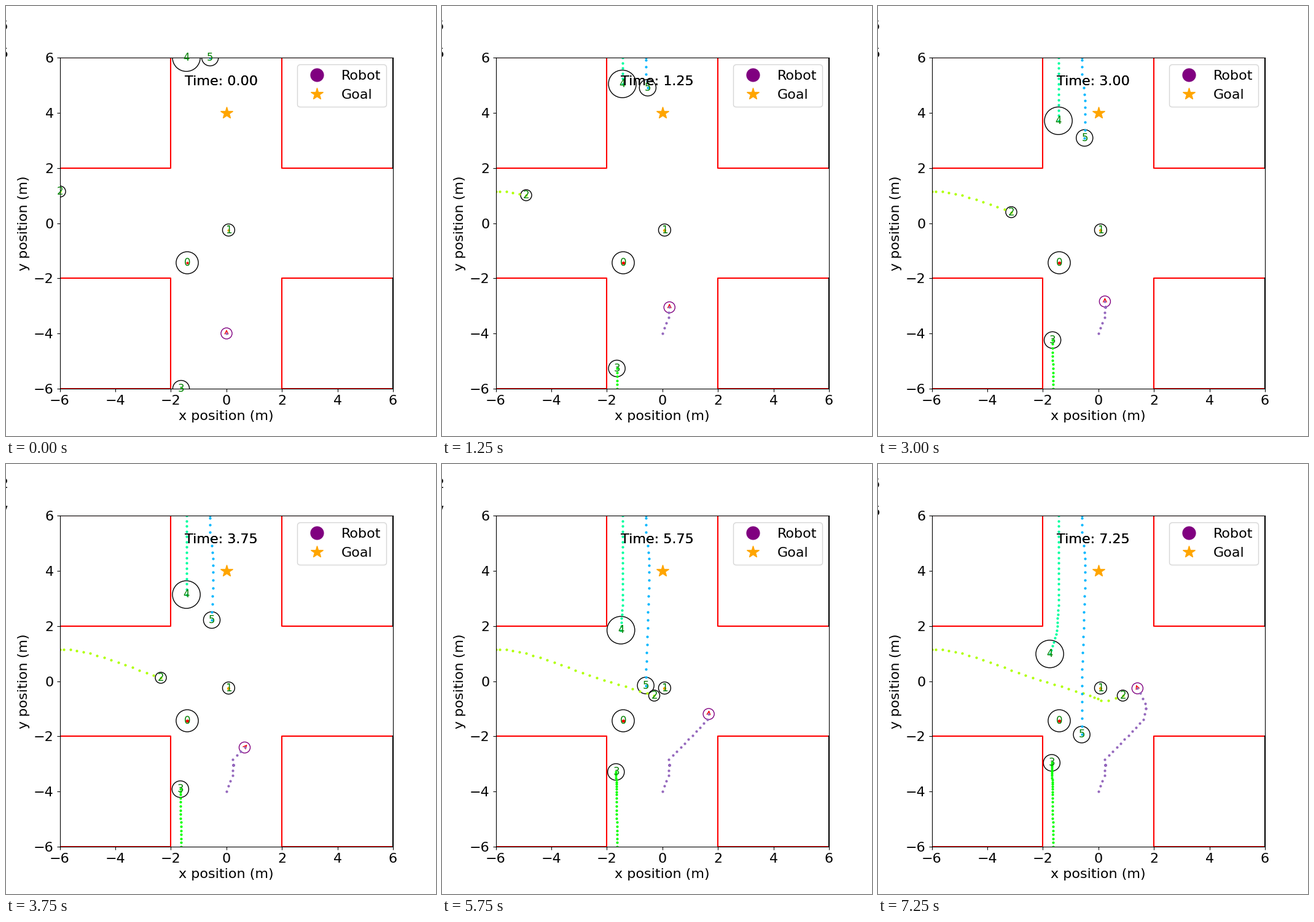
A matplotlib script for the animation above (7.5 s loop, 700 by 700 pixels).

```python
import numpy as np
import matplotlib
import matplotlib.pyplot as plt
from matplotlib.animation import FuncAnimation
from matplotlib.lines import Line2D
from matplotlib.patches import ArrowStyle, Circle, FancyArrowPatch

FRAMES = 30
STEP = 0.25  # seconds per frame
SIZE = 16
t = np.arange(FRAMES)


def keyed(*keys):
    """Piecewise linear motion through (step, value) pairs."""
    return np.interp(t, *zip(*keys))


# Each mover: radius, x and y over time in stage pixels
HUMANS = [
    (0.40, 295, 418),
    (0.22, 362.4, 364.7),
    (0.20,
     keyed((0, 88), (1, 94), (5, 137), (12, 217), (23, 345.5), (25, 358.5),
           (26, 363), (29, 398.5)),
     keyed((0, 302), (2, 302), (5, 308), (8, 319), (15, 348), (23, 377),
           (26, 385), (27, 385), (29, 377))),
    (0.30,
     285 - 0.076 * t,
     623 - np.minimum(6.6 * t, 180 * (1 - np.exp(-0.049 * t)))),
    (0.50,
     293.6 - 0.4 * np.clip(t - 17, 0, 6) - 2 * np.clip(t - 23.2, 0, None),
     84 + 8.57 * np.minimum(t, 18) + 6.45 * np.clip(t - 18, 0, None)),
    (0.30,
     keyed((3, 332.2), (7, 337.5), (9, 337.5), (15, 335), (23, 331.6)),
     keyed((0, 84), (1, 88), (5, 133), (9, 175.5), (15, 254), (29, 440.5))),
]
ROBOT = (0.20,
         keyed((0, 359), (3, 368.5), (5, 370.3), (12, 369.4), (15, 388.5),
               (19, 414), (22, 432), (24, 436.3), (26, 435), (29, 422.4)),
         keyed((0, 533), (5, 490.5), (11, 490), (12, 481), (15, 461.5),
               (22, 416), (24, 398), (25, 398), (29, 365.2)))
HEADING = np.radians(keyed((12, 90), (13, 50), (22, 45), (23, 85), (29, 112)))


class Body:
    def __init__(self, ax, radius, px, py, dot, edge, label=None):
        x = (px - 358.75) / 45.208 + 0 * t
        y = (353.5 - py) / 44.917 + 0 * t
        self.path = np.column_stack([x, y])
        self.circle = ax.add_patch(
            Circle(self.path[0], radius, fill=False, edgecolor=edge, linewidth=1))
        self.trail, = ax.plot([], [], "o", color=dot, markersize=2)
        self.text = label and ax.text(0, 0, label, color="green", fontsize=12)

    def move(self, i):
        x, y = self.path[i]
        self.circle.center = x, y
        self.trail.set_data(*self.path[:i + 1].T)
        if self.text:
            self.text.set_position((x - 0.11, y - 0.11))


fig, ax = plt.subplots(figsize=(7, 7), dpi=100)
ax.set_xlim(-6, 6)
ax.set_ylim(-6, 6)
ax.tick_params(labelsize=SIZE)
ax.set_xticks(range(-6, 7, 2))
ax.set_yticks(range(-6, 7, 2))
ax.set_xlabel("x position (m)", fontsize=SIZE)
ax.set_ylabel("y position (m)", fontsize=SIZE)

# Corner blocks of the crossing
for sx in (-1, 1):
    for sy in (-1, 1):
        ax.plot([6 * sx, 2 * sx, 2 * sx, 6 * sx],
                [2 * sy, 2 * sy, 6 * sy, 6 * sy], color="red", linewidth=1.5)
for sy in (-1, 1):
    ax.plot([6, 6], [2 * sy, 6 * sy], color="black", linewidth=1.5)

goal = Line2D([0], [4], color="orange", marker="*", linestyle="None", markersize=15)
ax.add_line(goal)
robot_key = Line2D([], [], color="purple", marker="o", linestyle="None", markersize=15)
ax.legend([robot_key, goal], ["Robot", "Goal"], fontsize=SIZE, loc="upper right")

hues = matplotlib.colormaps["hsv"].resampled(10)
bodies = [Body(ax, *human, hues(k), "black", str(k))
          for k, human in enumerate(HUMANS)]
robot = Body(ax, *ROBOT, "tab:purple", "purple")
bodies.append(robot)

arrow = ax.add_patch(FancyArrowPatch(
    (0, 0), (0, 1), color="red",
    arrowstyle=ArrowStyle("->", head_length=4, head_width=2)))

# The clock is painted twice, which makes its edges heavier
clocks = [ax.text(-1.5, 5, "", fontsize=SIZE) for _ in range(2)]
# Last digits of two readouts that lie mostly beyond the left border
readouts = [ax.text(-8.18, y, "", fontsize=SIZE) for y in (7, 6)]


def update(i):
    for body in bodies:
        body.move(i)
    start = robot.path[i]
    aim = np.array([np.cos(HEADING[i]), np.sin(HEADING[i])])
    arrow.set_positions(tuple(start), tuple(start + ROBOT[0] * aim))
    for clock in clocks:
        clock.set_text(f"Time: {i * STEP:.2f}")
    for text, digit in zip(readouts, "27" if 14 <= i <= 25 else "65"):
        text.set_text(digit)


anim = FuncAnimation(fig, update, frames=FRAMES, init_func=lambda: [],
                     interval=250, repeat=True, repeat_delay=0)
plt.show()
```
